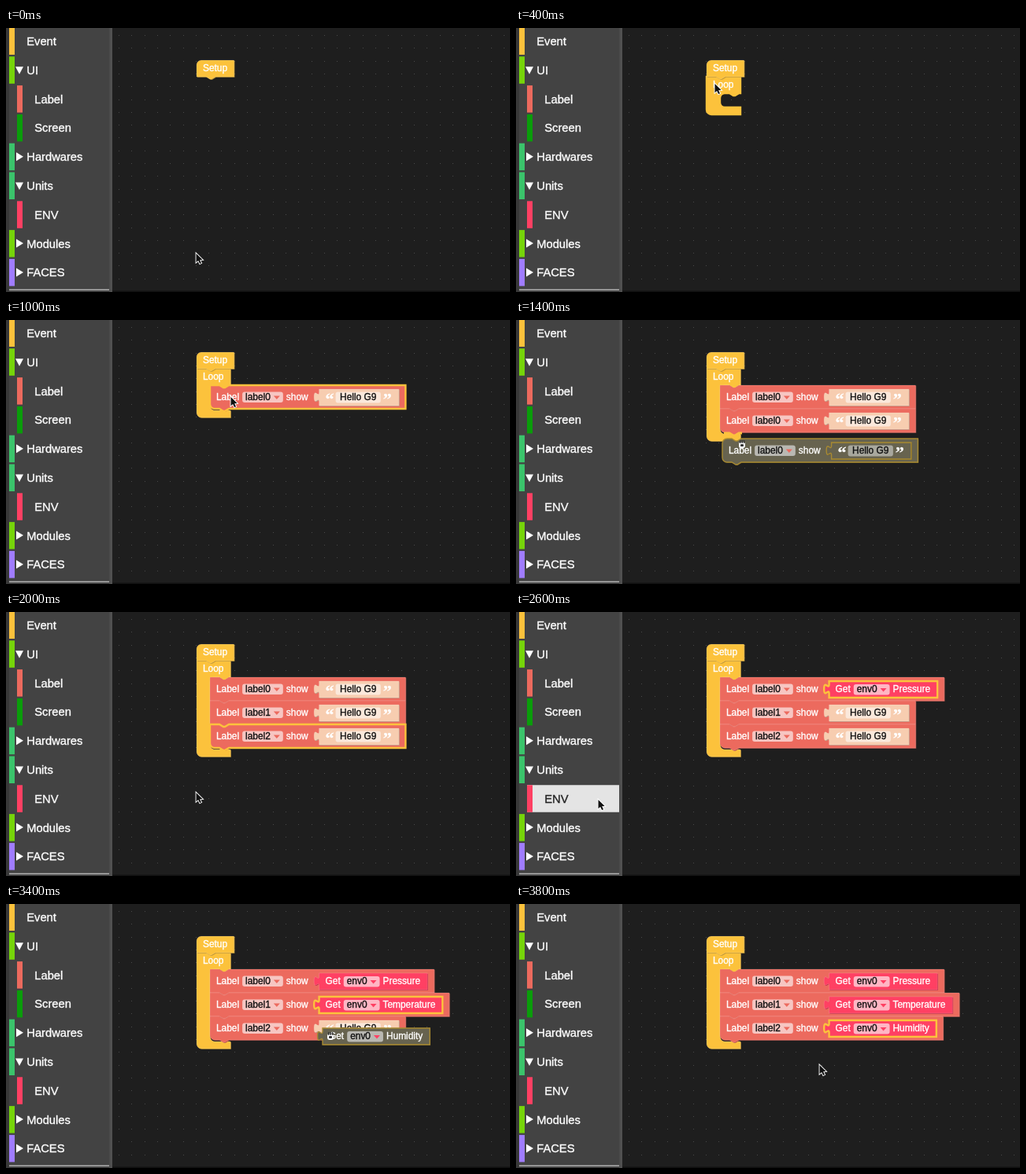
Write an HTML page with a canvas that moves like this. It is 640 by 336 pixels and loops after 4 s.

```html
<!DOCTYPE html>
<html lang="en">
<head>
<meta charset="utf-8">
<title>Block editor</title>
<style>
html, body { margin: 0; height: 100%; overflow: hidden; background: #1e1e1e; }
canvas { display: block; }
</style>
</head>
<body>
<canvas id="stage" width="640" height="336"></canvas>
<script>
const g = document.getElementById('stage').getContext('2d');
const FONT = '"Liberation Sans", Arial, sans-serif';
const SMALL = '11.9px ' + FONT;
const YELLOW = '#fcc23c', RED = '#ec6a5e', PINK = '#ff4063', GREEN = '#76d40a', TEAL = '#3bc46b';
let ghost = false; // blocks not yet attached are drawn dimmed

function rect(x, y, w, h, color, r = 0) {
  g.fillStyle = color;
  g.beginPath();
  g.roundRect(x, y, w, h, r);
  g.fill();
}

// Text with a hairline stroke for a slightly heavier weight
function put(s, x, y, color = '#fff', font = SMALL) {
  g.font = font;
  g.fillStyle = g.strokeStyle = color;
  g.lineWidth = 0.35;
  g.fillText(s, x, y);
  g.strokeText(s, x, y);
}

function width(s) {
  g.font = SMALL;
  return g.measureText(s).width;
}

function poly(color, ...p) {
  g.fillStyle = color;
  g.beginPath();
  for (let i = 0; i < p.length; i += 2) g.lineTo(p[i], p[i + 1]);
  g.fill();
}

// Fills an outline with a dark lower edge and a light rim
function shape(x, y, d, color, sel) {
  const path = new Path2D(d);
  g.save();
  g.translate(x + 0.8, y + 0.8);
  g.fillStyle = ghost ? '#8a712c' : color;
  g.fill(path);
  g.fillStyle = 'rgba(0,0,0,.25)';
  g.fill(path);
  g.translate(-0.8, -0.8);
  g.fillStyle = ghost ? '#67634f' : color;
  g.fill(path);
  g.lineWidth = sel ? 2.4 : ghost ? 1.4 : 0.7;
  g.strokeStyle = ghost ? '#a88a32' : sel ? YELLOW : 'rgba(255,255,255,.2)';
  g.stroke(path);
  g.restore();
}

// Items of a block: width, optional extra space, and a painter around a centre line
const text = s => ({ w: width(s), end: 5, draw: (x, y) => put(s, x, y + 3.6) });

const drop = (s, color) => ({
  w: width(s) + 20,
  draw(x, y) {
    rect(x, y - 6.5, this.w, 13.5, ghost ? '#b9b8b2' : 'rgba(255,255,255,.62)', 3);
    put(s, x + 4, y + 3.6, '#111');
    const a = x + this.w - 12;
    poly(color, a, y - 1.5, a + 8, y - 1.5, a + 4, y + 3);
  }
});

const swatch = color => ({ w: 19, draw: (x, y) => rect(x, y - 6.5, 19, 13, color, 4) });

const socket = b => ({ w: b.w, lead: 10, tail: 4.5, draw: (x, y) => b.draw(x, y - 10) });

const plugPath = w => `M0,0H${w}V21H0V16c0,-8 -6.4,6.4 -6.4,-6s6.4,2 6.4,-6z`;

const stackPath = (w, h, joined, last) => (joined ? 'M0,0' : 'M0,6a6,6 0 0 1 6,-6') +
  `H12l5,3h2l5,-3H${w}V${h}H24l-5,3h-2l-5,-3` + (last ? 'H6a6,6 0 0 1 -6,-6z' : 'H0z');

function block(color, items, { h = 30, plug = false, joined = false, last = true, sel = false } = {}) {
  let x = 8;
  const xs = items.map(it => {
    const at = x + (it.lead || 0);
    x = at + it.w + 4 + (it.tail || 0);
    return at;
  });
  const w = x + (items.at(-1).end || 0);
  return {
    w,
    draw(bx, by) {
      shape(bx, by, plug ? plugPath(w) : stackPath(w, h, joined, last), color, sel);
      items.forEach((it, i) => it.draw(bx + xs[i], by + h / 2));
    }
  };
}

const number = {
  w: 24,
  draw(x, y) {
    shape(x, y, plugPath(24), '#b2dcf0');
    rect(x + 4, y + 3.5, 16, 14, '#e6f4fb', 3);
    put('0', x + 8.7, y + 14, '#111');
  }
};

const greeting = 'Hello G9';
const string = {
  w: width(greeting) + 55,
  draw(x, y) {
    const box = this.w - 44, font = 'bold 22px "Liberation Serif", serif';
    shape(x, y, plugPath(this.w), '#f7cdb0');
    rect(x + 21, y + 3.5, box, 14, ghost ? '#a9a89e' : '#fbe8db', 3);
    put('\u201c', x + 8, y + 20, '#fff', font);
    put(greeting, x + 26.5, y + 14, '#111');
    put('\u201d', x + 24 + box, y + 20, '#fff', font);
  }
};

const reading = (name, sel) =>
  block(PINK, [text('Get'), drop('env0', PINK), text(name)], { h: 21, plug: true, sel });

const label = (name, value, opts) =>
  block(RED, [text('Label'), drop(name, RED), text('show'), socket(value)], opts);

const setter = (items, h) => block(RED, [text('Set'), drop('label0', RED), ...items], { h });

function setup() {
  shape(242, 41, 'M0,6a6,6 0 0 1 6,-6H47.5V21H24l-5,3h-2l-5,-3H0z', YELLOW);
  put('Setup', 250, 55);
}

function loop(x, y, inner, joined, sel) {
  const start = joined ? 'M0,0' : 'M0,6a6,6 0 0 1 6,-6';
  shape(x, y, start + 'H12l5,3h2l5,-3H43V21H41l-5,3h-2l-5,-3H23a6,6 0 0 0 -6,6' +
    `V${15 + inner}a6,6 0 0 0 6,6H43v9H6a6,6 0 0 1 -6,-6z`, YELLOW, sel);
  put('Loop', x + 8, y + 14);
}

// Sidebar rows: name, colour, depth, arrow
const rows = [
  ['Event', YELLOW, 0, ''], ['UI', GREEN, 0, 'open'], ['Label', RED, 1, ''],
  ['Screen', '#0a9d0a', 1, ''], ['Hardwares', TEAL, 0, 'shut'], ['Units', TEAL, 0, 'open'],
  ['ENV', PINK, 1, ''], ['Modules', GREEN, 0, 'shut'], ['FACES', '#a07cff', 0, 'shut']
];

function sidebar(active, hover) {
  rect(0, 0, 135, 336, '#434343');
  rect(0, 0, 4, 336, '#383838');
  rect(131.5, 0, 3.5, 336, '#505050');
  rows.forEach(([name, color, depth, arrow], i) => {
    const y = 17 + i * 36.8, x = depth ? 14 : 4;
    const lit = name === hover;
    if (name === active || lit) rect(x, y - 17.5, 131 - x, 34.5, lit ? '#e4e4e4' : color);
    rect(x, y - 17.5, 7, 34.5, color);
    if (arrow === 'open') poly('#fff', 12, y - 4.5, 22, y - 4.5, 17, y + 5);
    if (arrow === 'shut') poly('#fff', 13, y - 6, 22, y - 0.5, 13, y + 5);
    put(name, depth ? 36.3 : 26.3, y + 5, lit ? '#222' : '#fff', '14.7px ' + FONT);
  });
  rect(4, 332.5, 127, 1.2, '#c8c8c8');
}

function flyout(kind) {
  const right = { Event: 230, Label: 458, ENV: 330 }[kind];
  rect(135, 0, right - 135, 336, 'rgba(49,49,49,.9)', [0, 8, 8, 0]);
  if (kind === 'Event') loop(149, 9, 18);
  if (kind === 'ENV')
    ['Pressure', 'Temperature', 'Humidity'].forEach((s, i) => reading(s).draw(156, 14 + i * 44));
  if (kind !== 'Label') return;
  const n = socket(number);
  const list = [
    [9, label('label0', string)],
    [62, setter([text('x'), n, text('y'), n])],
    [115, setter([text('x'), n])],
    [168, setter([text('y'), n])],
    [221, setter([text('color'), swatch('#f00')], 21)],
    [265, setter([text('color by R'), n, text('G'), n, text('B'), n])],
    [318, setter([text('from'), drop('FONT_Default', RED)], 21)]
  ];
  for (const [y, b] of list) b.draw(149, y);
}

function cursor(x, y) {
  const s = 0.87;
  g.beginPath();
  for (const [dx, dy] of [[0, 0], [0, 13], [3, 10.3], [5.3, 15], [7.5, 14], [5.3, 9.4], [9.3, 9.2]])
    g.lineTo(x + 0.5 + dx * s, y + 1 + dy * s);
  g.closePath();
  g.lineWidth = 1.8;
  g.strokeStyle = '#fff';
  g.stroke();
  g.fillStyle = '#111';
  g.fill();
}

function hand(x, y) {
  rect(x - 4, y - 3, 8, 8, '#fff', 3);
  for (let i = 0; i < 3; i++) rect(x - 3 + i * 2.4, y - 5, 1.6, 4, '#333', 1);
  rect(x - 2, y, 4, 3, '#333', 1);
}

const pointer = [
  [241, 286], [180, 24], [252, 70], [158, 43], [285, 99], [285, 97], [290, 128],
  [287, 158], [300, 160], [340, 130], [241, 229], [160, 25], [412, 108], [104, 238],
  [160, 60], [224, 239], [160, 103], [412, 168], [410, 160], [385, 204]
];
const menus = { 1: 'Event', 3: 'Label', 11: 'ENV', 14: 'ENV', 16: 'ENV' };
const drags = {
  4: () => label('label0', string).draw(262, 92),
  7: () => label('label0', string).draw(262, 151),
  12: () => reading('Pressure').draw(402, 98),
  17: () => reading('Humidity').draw(402, 158)
};
const plugged = [['Pressure', 13], ['Temperature', 15], ['Humidity', 18]];

function scene(step) {
  rect(0, 0, 640, 336, '#1e1e1e');
  for (let y = 9; y < 333; y += 16.3)
    for (let x = 143; x < 640; x += 16.3) rect(Math.round(x), Math.round(y), 1, 1, '#494949');
  rect(135, 334.5, 505, 1.5, '#101010');

  const count = step < 5 ? 0 : step < 6 ? 1 : step < 8 ? 2 : 3;
  if (step >= 2) loop(242, 62, count ? count * 30 + 2 : 18, true, step === 2);
  setup();
  for (let i = 0; i < count; i++) {
    const [name, from] = plugged[i];
    const next = i < 2 ? plugged[i + 1][1] : 20;
    const value = step >= from ? reading(name, step < next) : string;
    const renamed = step >= 8 + i;
    const last = i === count - 1;
    const sel = last && step < 11 && step !== 7;
    label('label' + (renamed ? i : 0), value, { joined: true, last, sel }).draw(259, 83 + i * 30);
  }
  // Loop tab seated in the first block
  if (count) poly(YELLOW, 271, 82.5, 276, 86, 278, 86, 283, 82.5);

  if (step === 7) {
    g.strokeStyle = YELLOW;
    g.lineWidth = 3;
    g.stroke(new Path2D('M264,144h7l5,3h2l5,-3h4'));
  }
  const menu = menus[step];
  if (menu) flyout(menu);
  if (drags[step]) {
    ghost = true;
    drags[step]();
    ghost = false;
  }
  sidebar(menu, step === 13 ? 'ENV' : '');
  (drags[step] ? hand : cursor)(...pointer[step]);
}

function frame() {
  scene(Math.floor(performance.now() % 4000 / 200));
  requestAnimationFrame(frame);
}
frame();
</script>
</body>
</html>
```
